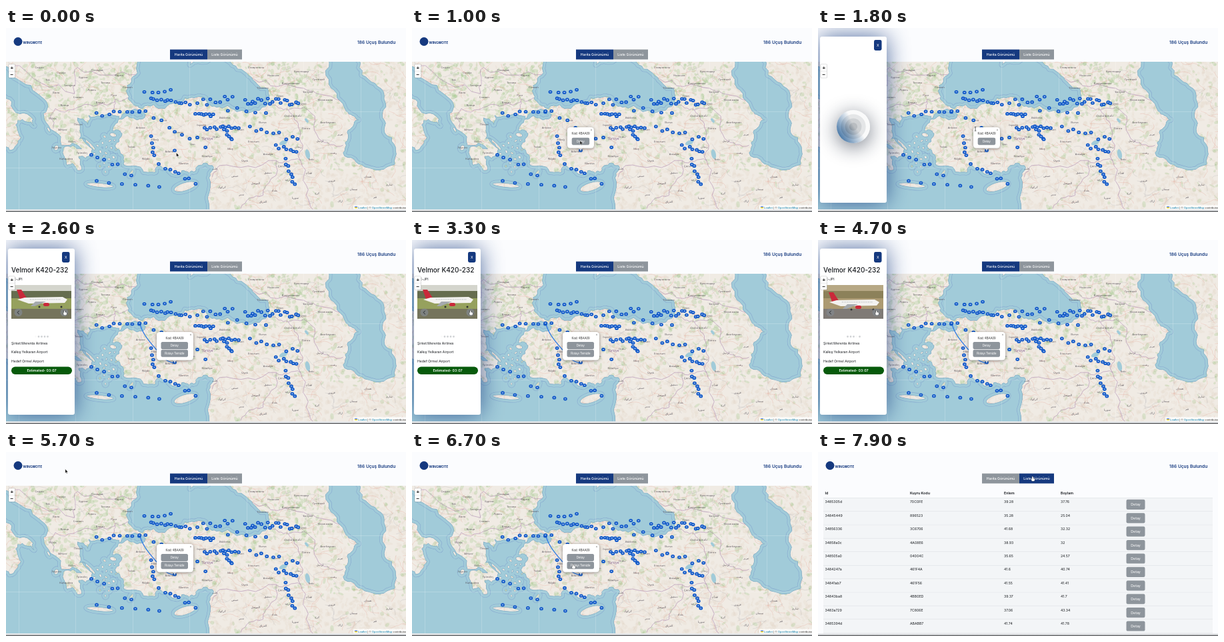
Write an HTML page with a canvas that moves like this. It is 600 px wide and 278 px high and loops after 8000 ms.

```html
<!DOCTYPE html>
<html lang="tr">
<head>
<meta charset="utf-8">
<title>Uçuş haritası</title>
<style>
html, body { margin: 0; width: 100%; height: 100%; overflow: hidden; background: #fbfcfe; }
canvas { display: block; width: 600px; height: 278px; }
</style>
</head>
<body>
<canvas id="stage"></canvas>
<script>
const W = 600, H = 278, LOOP = 8000;
const NAVY = '#15397f', GREY = '#8e959c', SEA = '#a1cbd9', LAND = '#f0ebe4', INK = '#16191d';
const UI = 'Inter, "Open Sans", sans-serif', ARIAL = '"Liberation Sans", Arial, sans-serif', NOTO = '"Noto Sans", sans-serif';
const dpr = window.devicePixelRatio || 1;

function sized(canvas) {
  canvas.width = W * dpr;
  canvas.height = H * dpr;
  const ctx = canvas.getContext('2d');
  ctx.scale(dpr, dpr);
  return ctx;
}
const view = sized(document.getElementById('stage'));
const mapCanvas = document.createElement('canvas');
let c = sized(mapCanvas);

// ---------- helpers ----------
function rect(x, y, w, h, fill, r = 0) {
  c.beginPath();
  c.roundRect(x, y, w, h, r);
  c.fillStyle = fill;
  c.fill();
}
function disc(x, y, rx, fill, ry = rx, rot = 0) {
  c.beginPath();
  c.ellipse(x, y, rx, ry, rot, 0, 7);
  c.fillStyle = fill;
  c.fill();
}
function poly(pts, fill) {
  c.beginPath();
  for (let i = 0; i < pts.length; i += 2) c.lineTo(pts[i], pts[i + 1]);
  c.closePath();
  c.fillStyle = fill;
  c.fill();
}
function text(s, x, y, size, color, { weight = 400, font = UI, align = 'left' } = {}) {
  c.font = `${weight} ${size}px ${font}`;
  c.textAlign = align;
  c.fillStyle = color;
  c.fillText(s, x, y + size * 0.36);
}
function shadowed(color, blur, dy, draw) {
  c.save();
  c.shadowColor = color;
  c.shadowBlur = blur * dpr;
  c.shadowOffsetY = dy * dpr;
  draw();
  c.restore();
}
function seeded(seed) {
  return () => (seed = (seed * 16807) % 2147483647) / 2147483647;
}
const mix = (a, b, k) => a + (b - a) * k;

// ---------- map: key points as longitude, latitude ----------
const merc = lat => Math.log(Math.tan(Math.PI / 4 + lat * Math.PI / 360));
const px = lon => 143 + 15.2 * (lon - 25.04);
const py = lat => 237 - 871 * (merc(lat) - 0.6581);

const mediterranean = [14,44.6, 16.4,43.5, 19.4,41.9, 19.4,40.4, 21.1,38.4, 23.1,38.1, 21.3,38.2, 21.7,36.8, 22.3,36.9,
  22.6,36.5, 23.1,36.5, 22.8,37.5, 24.05,37.7, 22.9,38.9, 22.7,40.5, 23.7,40, 23.8,40.7, 26,40.8, 26.8,40.6, 26.15,39.5,
  26.9,39.5, 26.8,38.7, 26.4,38.3, 27.2,37.6, 27.4,36.8, 29.2,36.3, 30.4,36.3, 30.7,36.85, 32.3,36.1, 33.7,36.2, 34.6,36.8,
  36,36.8, 35.8,35.5, 35,32, 14,32, 14,38.3, 16,38, 17.1,39, 16.8,40.3, 18.4,39.9, 18.3,40.4, 16.2,41.7, 14,42.2];
const blackSea = [29.6,46, 28.6,43.8, 27.5,42.5, 28.2,41.5, 29.1,41.2, 31.3,41.2, 33.3,42, 35.1,42.05, 36.4,41.3, 38.4,40.95,
  40.5,41.05, 41.6,41.6, 41.4,42.7, 39.6,43.6, 37.5,44.7, 36.6,45.4, 33.8,44.4, 33.4,45.4];
const caspian = [47,45.4, 47.5,43, 49.2,41, 50.4,40.35, 49.3,39.4, 48.9,37.8, 51,36.7, 54,36.9, 53.7,39, 52.8,40.5, 52.6,42.7, 50.5,44.2, 51,45.4];
const marmara = [26.8,40.4, 28,41.05, 29.4,40.75, 28.4,40.4];
const borders = [
  [28,42, 26.4,41.9, 26.1,40.7], [26.4,41.7, 23,41.35, 20.5,41.2, 20.3,39.7], [28.6,43.7, 22.7,44.2, 22.4,42.3, 16,44.3],
  [36,35.9, 36.7,36.8, 42.3,37.2, 44.7,37.2, 44.6,39.6, 43.5,41.1, 41.6,41.5], [40,43.4, 45,42.7, 48.6,41.8],
  [43.5,41.1, 45,41.3, 46.5,38.9, 48.9,38.4], [44.7,37.2, 45.5,34, 46,33], [42.3,37.2, 41,34.4, 38.8,33.3]];
// lon, lat, radii, tilt
const bigIsles = [[24.9, 35.22, 20, 3, 0.1], [33.3, 35.1, 17, 6, -0.3], [23.8, 38.5, 13, 2.5, 0.75],
  [28, 36.2, 2, 5, 0.5], [26.2, 39.2, 5, 3, 0.3], [19.85, 39.6, 1.5, 4, -0.5], [20.6, 38.2, 3, 4, 0.4]];

// names spread over x, y, width, height
const regions = [
  ['София Пловдив Скопје Варна Бургас Niš Тетово Sarajevo Плевен Ловеч Бяла Русе Сливен Tiranë Видин Враца', 50, 58, 140, 60],
  ['Ελλάς Πάτρα Αθήνα Λαμία Βόλος Λάρισα Τρίπολη Καλαμάτα', 70, 132, 62, 70],
  ['Tekirdağ Balıkesir İzmir Bursa Isparta Ankara Kayseri Aksaray Sivas Ordu Elâzığ Erzurum Van Tokat Muş Adana Antalya Kütahya Niğde Uşak Manisa Çorum', 180, 130, 240, 80],
  ['Ставрополь Краснодар Нальчик Грозный Владикавказ Тбилиси Батуми Гори Махачкала საქართველო', 375, 56, 110, 62],
  ['Հայաստան Azərbaycan Gəncə تبریز اردبیل زنجان رشت Bakı', 430, 128, 85, 75],
  ['حلب دمشق حمص الرقة الموصل كركوك بغداد تدمر سوريا العراق', 312, 210, 130, 55],
  ['تهران همدان قزوین ساری سمنان کرج قم اراک', 455, 215, 140, 50]];

function rough(pts, rnd, amount, depth) {
  if (!depth) return pts;
  const out = [];
  pts.forEach(([x, y], i) => {
    out.push([x, y]);
    if (i === pts.length - 1) return;
    const dx = pts[i + 1][0] - x, dy = pts[i + 1][1] - y;
    const k = (rnd() - 0.5) * amount * Math.min(1, 30 / Math.hypot(dx, dy));
    out.push([x + dx / 2 - dy * k, y + dy / 2 + dx * k]);
  });
  return rough(out, rnd, amount, depth - 1);
}
function trace(path, flat, rnd, closed) {
  const pts = [];
  for (let i = 0; i < flat.length; i += 2) pts.push([px(flat[i]), py(flat[i + 1])]);
  if (closed) pts.push(pts[0]);
  rough(pts, rnd, 0.45, 3).forEach(([x, y], i) => path[i ? 'lineTo' : 'moveTo'](x, y));
}
function island(path, x, y, rx, ry, rot) {
  const e = new Path2D();
  e.ellipse(x, y, rx, ry, rot, 0, 7);
  path.addPath(e);
}
function seaPath(rnd) {
  const sea = new Path2D();
  for (const s of [mediterranean, blackSea, caspian, marmara]) trace(sea, s, rnd, true);
  for (const [lon, lat, ...shape] of bigIsles) island(sea, px(lon), py(lat), ...shape);
  for (let i = 0; i < 20; i++) {
    const a = i * 2.4, r = Math.sqrt(i / 20);
    island(sea, 150 + Math.cos(a) * 19 * r, 189 + Math.sin(a) * 29 * r, 1 + rnd() * 1.8, 0.8 + rnd() * 1.2, rnd() * 3);
  }
  return sea;
}
function greenness(x, y) {
  if (y < 136 && x < 470) return 0.7;
  if (x < 225) return 0.5;
  if (x > 480 && y > 195 && y < 218) return 0.6;
  return y < 205 ? 0.2 : 0.07;
}
function drawMap() {
  const rnd = seeded(77), sea = seaPath(rnd);
  c.save();
  c.beginPath();
  c.rect(0, 51, W, 223);
  c.clip();
  rect(0, 51, W, 223, LAND);
  for (let i = 0; i < 3800; i++) {
    const x = rnd() * W, y = 51 + rnd() * 223, green = rnd() < greenness(x, y);
    disc(x, y, 1 + rnd() * 4, green ? 'rgba(150,196,128,.25)' : 'rgba(226,209,194,.2)', 0.8 + rnd() * 2.4, rnd() * 3);
  }
  // winding roads
  c.lineWidth = 0.45;
  for (let i = 0; i < 620; i++) {
    let x = W * rnd() ** 1.25, y = 51 + rnd() * 223, a = rnd() * 6.3;
    c.strokeStyle = i % 3 ? 'rgba(222,140,120,.5)' : 'rgba(140,140,155,.4)';
    c.beginPath();
    c.moveTo(x, y);
    for (let k = 0; k < 6; k++) {
      a += (rnd() - 0.5) * 1.2;
      c.lineTo(x += Math.cos(a) * 4.5, y += Math.sin(a) * 3.5);
    }
    c.stroke();
  }
  c.lineWidth = 0.8;
  c.strokeStyle = 'rgba(165,125,170,.65)';
  for (const b of borders) {
    const p = new Path2D();
    trace(p, b, rnd, false);
    c.stroke(p);
  }
  c.fillStyle = SEA;
  c.fill(sea, 'evenodd');
  // thin line at a fixed distance from every shore
  c.save();
  c.clip(sea, 'evenodd');
  c.lineJoin = 'round';
  for (const [w, color] of [[9, '#86a9cf'], [7.8, SEA]]) {
    c.lineWidth = w;
    c.strokeStyle = color;
    c.stroke(sea);
  }
  c.restore();
  c.lineWidth = 0.5;
  c.strokeStyle = 'rgba(110,155,180,.8)';
  c.stroke(sea);
  disc(px(43), py(38.6), 6.5, SEA, 3.2, -0.4);
  disc(px(45.4), py(37.7), 3.4, SEA, 7.5, -0.2);
  disc(px(45.3), py(40.3), 2, SEA, 4, -0.6);

  // tile seams
  for (let x = 19; x < W; x += 85.5) rect(x, 51, 0.5, 223, 'rgba(255,255,255,.4)');
  for (let y = 126; y < 274; y += 85.5) rect(0, y, W, 0.5, 'rgba(255,255,255,.4)');

  c.setTransform(1, 0, 0, 1, 0, 0);
  const onLand = (x, y) => !c.isPointInPath(sea, x, y, 'evenodd');
  c.scale(dpr, dpr);
  for (const [names, x, y, w, h] of regions)
    names.split(' ').forEach((s, i, all) => {
      const lx = x + w * ((i * 0.618) % 1), ly = y + h * (i + 0.5) / all.length;
      if (onLand(lx, ly)) text(s, lx, ly, 4.2, 'rgba(80,74,82,.85)', { font: NOTO, align: 'center' });
    });
  text('Türkiye', 302, 167, 5, '#8b6a94', { font: NOTO, align: 'center' });

  rect(521, 267.5, 79, 6.5, 'rgba(255,255,255,.8)');
  rect(523, 269.5, 4, 1.4, '#4c7be1');
  rect(523, 270.9, 4, 1.4, '#ffd500');
  let x = 528;
  for (const [s, color] of [['Leaflet', '#0078a8'], [' | © ', '#333'], ['OpenStreetMap', '#0078a8'], [' contributors', '#333']]) {
    text(s, x, 271, 4.3, color, { font: ARIAL });
    x += c.measureText(s).width;
  }
  c.restore();
}

// ---------- flights: strands from x, y to x, y with count and spread ----------
const strands = [[209, 97, 246, 94, 5, 4], [217, 107, 275, 114, 12, 4], [288, 114, 340, 103, 9, 10], [358, 111, 438, 113, 20, 11],
  [136, 132, 208, 126, 9, 8], [285, 129, 312, 132, 8, 4], [333, 123, 389, 126, 5, 6], [298, 153, 349, 149, 12, 5],
  [328, 153, 339, 169, 6, 4], [365, 147, 438, 170, 9, 12], [222, 133, 298, 176, 8, 12], [219, 165, 222, 193, 5, 4],
  [127, 187, 189, 222, 7, 10], [136, 231, 231, 242, 6, 4], [230, 208, 283, 233, 8, 6], [405, 178, 437, 185, 7, 6], [418, 200, 433, 237, 8, 6]];
const flightRnd = seeded(41);
const flights = [[253, 185], [200, 127]];
for (const [x0, y0, x1, y1, n, spread] of strands)
  for (let i = 0; i < n; i++) {
    const k = i / (n - 1);
    flights.push([mix(x0, x1, k) + (flightRnd() - 0.5) * 3, mix(y0, y1, k) + (flightRnd() - 0.5) * spread]);
  }

function drawFlights() {
  for (const [x, y] of flights) {
    disc(x, y, 2.9, '#1259c8', 2.6);
    disc(x, y, 1.3, '#a5c2ee', 0.8);
  }
}
function drawRoute() {
  c.beginPath();
  c.moveTo(200, 124);
  c.bezierCurveTo(204, 140, 212, 150, 225, 165);
  c.bezierCurveTo(232, 173, 238, 184, 253, 186);
  c.strokeStyle = '#2f7be6';
  c.lineWidth = 1.2;
  c.stroke();
}
function button(s, x, y, w, h, size, font) {
  rect(x, y, w, h, GREY, 2.2);
  text(s, x + w / 2, y + h / 2, size, '#fff', { font, align: 'center' });
}
function drawPopup(full, alpha) {
  const [x, y, w] = full ? [226, 139, 55] : [233, 150, 40];
  c.save();
  c.globalAlpha = alpha;
  shadowed('rgba(0,0,0,.4)', 5, 1, () => {
    poly([249, 180, 257, 180, 253, 185], '#fff');
    rect(x, y, w, 181.5 - y, '#fff', 4.5);
  });
  text('×', x + w - 4, y + 4, 5, '#757575', { font: ARIAL, align: 'center' });
  text('Kod: 4BAA09', 253, y + 9.3, 4.5, '#333', { font: ARIAL, align: 'center' });
  if (full) {
    button('Detay', 232.5, 154, 40.5, 11, 4.5, ARIAL);
    button('Rotayı Temizle', 232.5, 165.7, 40.5, 11, 4.5, ARIAL);
  } else button('Detay', 239.7, 165.7, 26.5, 11, 4.5, ARIAL);
  c.restore();
}

// ---------- page ----------
function drawHeader() {
  rect(0, 0, W, H, '#fbfcfe');
  disc(18, 20.5, 6.5, NAVY);
  text('WINGMOTE', 25.5, 22, 5, NAVY, { weight: 700 });
  text('186 Uçuş Bulundu', 527, 21.5, 6.6, NAVY, { weight: 600 });
}
function drawTabs(list) {
  [['Harita Görünümü', 246, 56, !list], ['Liste Görünümü', 302, 52, list]].forEach(([s, x, w, on]) => {
    rect(x, 32.6, w, 15, on ? NAVY : GREY);
    text(s, x + w / 2, 40.3, 5.2, '#fff', { weight: 500, align: 'center' });
  });
}
function drawZoom() {
  rect(3.6, 54.4, 10.4, 21.2, 'rgba(0,0,0,.22)', 1.6);
  rect(4.2, 55, 9.2, 20, '#fff', 1.2);
  rect(4.2, 64.9, 9.2, 0.4, '#ccc');
  ['+', '−'].forEach((s, i) => text(s, 8.8, 60 + i * 10, 8, '#111', { weight: 700, font: ARIAL, align: 'center' }));
}
function drawFoot() {
  const g = c.createLinearGradient(0, 274, 0, H);
  g.addColorStop(0, '#f0f1f3');
  g.addColorStop(0.5, '#d8dadd');
  g.addColorStop(1, '#3a3b3d');
  rect(0, 274, W, 4, g);
}

const rows = ['3485305d 70C0FE 39.28 37.76', '34845449 896523 35.28 25.04', '34856336 3C6706 41.68 32.32', '34858a0c 4A08E6 38.93 32',
  '348505a0 04004C 35.65 24.57', '3484247a 461F4A 41.6 40.74', '34841ab7 461F56 41.55 41.41', '34843ba8 4BB0ED 39.37 41.7',
  '3483a729 7C806E 37.06 43.34', '3485394d ABABB7 41.74 41.78'];
const cols = [10.5, 138, 279, 364];
function drawList() {
  ['Id', 'Kuyru Kodu', 'Enlem', 'Boylam'].forEach((s, i) => text(s, cols[i], 62, 5.3, INK, { weight: 600 }));
  rows.forEach((row, r) => {
    const y = 69 + r * 20.4;
    rect(8, y, 584, 20.4, '#f3f5f7');
    rect(8, y, 584, 0.5, '#d9dde1');
    row.split(' ').forEach((s, i) => text(s, cols[i], y + 6.6, 5.2, INK));
    button('Detay', 462.5, y + 2.8, 28, 15.2, 5.3, UI);
  });
  rect(8, 273, 584, 0.5, '#d9dde1');
}

// ---------- detail panel ----------
function drawSpinner(t) {
  const x = 53, y = 149;
  shadowed('rgba(20,30,50,.6)', 30, 6, () => disc(x, y, 25, '#e8eaec'));
  for (let i = 0; i < 4; i++) {
    const r = 25 - i * 6.3, a = 2.55 + (t - 1800) / 1000 * Math.PI * (1 - i * 0.1);
    const dx = Math.cos(a) * r, dy = Math.sin(a) * r;
    const g = c.createLinearGradient(x + dx, y + dy, x - dx, y - dy);
    g.addColorStop(0, `hsl(210 ${38 - i * 9}% ${48 + i * 3}%)`);
    g.addColorStop(0.6, `hsl(210 6% ${98 - i * 8}%)`);
    disc(x, y, r, g);
  }
}
function drawPhoto(slide) {
  const k = slide / 3, y = mix(91, 95, k), tail = '#c9293a';
  const tone = (hue, sat, light) => `hsl(${hue - 28 * k} ${sat}% ${light}%)`;
  c.save();
  c.beginPath();
  c.rect(8, 68, 90, 51);
  c.clip();
  rect(8, 68, 90, 51, tone(70, 8 + 18 * k, 82 - 20 * k));
  rect(8, 77, 90, 12, tone(75, 16 + 6 * k, 37 + 8 * k));
  rect(8, 88, 90, 31, tone(70, 26, 50 + 6 * k));
  rect(8, 104, 90, 15, tone(58, 12 - 8 * k, 41 + 7 * k));
  poly([16, y - 16, 23, y - 16, 32, y - 2, 22, y + 1], tail);
  poly([17, y - 1, 28, y - 4, 85, y - 5, 92, y - 1, 88, y + 4, 34, y + 5], '#f3f2f0');
  poly([44, y + 2, 60, y + 2, 43, y + 9, 37, y + 9], '#a5a9ae');
  rect(56, y + 4, 9, 5, tail, 2.5);
  for (let i = 0; i < 18; i++) rect(36 + i * 2.6, y - 1.6, 1, 0.9, '#77818c');
  for (const x of [50, 83]) disc(x, y + 10, 1.5, '#2f3134');
  c.restore();
  for (const d of [-1, 1]) {
    const x = 53 + d * 34.5;
    disc(x, 109.5, 6, 'rgba(130,135,140,.75)');
    c.beginPath();
    c.moveTo(x - d * 1.3, 106.8);
    c.lineTo(x + d * 1.4, 109.5);
    c.lineTo(x - d * 1.3, 112.2);
    c.strokeStyle = '#22262b';
    c.lineWidth = 1;
    c.stroke();
  }
}
function drawPanel(t) {
  shadowed('rgba(21,57,127,.75)', 34, 0, () => rect(3, 13, 100, 251, '#fff', 3));
  rect(84, 18, 11.5, 16, NAVY, 2.4);
  text('X', 89.7, 26, 5, '#fff', { weight: 500, align: 'center' });
  if (t < T.loaded) return drawSpinner(t);
  const slide = T.slides.filter(s => t >= s).length;
  text('Velmor K420-232', 8, 45.8, 10, INK, { weight: 500 });
  text('TC-JPI', 8, 58.7, 5.1, INK);
  drawPhoto(slide);
  for (let i = 0; i < 5; i++) disc(44.5 + i * 4.5, 146, 1.4, i === slide ? '#fafafa' : '#d0d2d5');
  ['Şirket:Merenta Airlines', 'Kalkış:Yelkaran Airport', 'Hedef:Ormel Airport'].forEach((s, i) => text(s, 8, 156 + i * 13.4, 5.1, INK));
  rect(8, 191.5, 91, 11.5, '#075a0b', 5.7);
  text('Estimated- 03:07', 53.5, 197.3, 5.3, '#fff', { weight: 600, align: 'center' });
}

// ---------- pointer: arrive, leave, x, y, shape while there ----------
const stops = [[0, 0, 255.5, 188.5, 'arrow'], [400, 700, 253, 185, 'hand'], [1050, 1300, 252, 170, 'hand'], [1720, 1830, 236, 152, 'text'],
  [2500, 4800, 88, 108, 'hand'], [5300, 5600, 88, 25, 'hand'], [6500, 6900, 242, 171, 'hand'], [7600, LOOP, 322, 38.5, 'hand']];

function pointerAt(t) {
  const i = stops.findLastIndex(s => t >= s[0]);
  const [, leave, x, y, shape] = stops[i];
  if (t <= leave) return [x, y, shape];
  const [arrive, , nx, ny] = stops[i + 1];
  let k = (t - leave) / (arrive - leave);
  k = k < 0.5 ? 4 * k ** 3 : 1 - 4 * (1 - k) ** 3;
  return [mix(x, nx, k), mix(y, ny, k), 'arrow'];
}
function drawPointer(t) {
  const [x, y, shape] = pointerAt(t);
  c.save();
  c.translate(x, y);
  c.lineJoin = 'round';
  if (shape === 'text') {
    rect(-0.3, -2.5, 0.7, 6, '#222');
    for (const e of [-2.7, 3.2]) rect(-1.3, e, 2.7, 0.5, '#222');
  } else if (shape === 'hand') {
    c.strokeStyle = '#222';
    c.lineWidth = 0.6;
    c.beginPath();
    c.roundRect(-1.8, 1.2, 4.8, 4.2, 1.4);
    c.roundRect(-1, -1.6, 1.4, 4.5, 0.7);
    c.stroke();
    c.fillStyle = '#fff';
    c.fill();
  } else {
    poly([0, 0, 0, 6, 1.4, 4.8, 2.3, 6.9, 3.2, 6.5, 2.3, 4.5, 4.2, 4.4], '#111');
    c.strokeStyle = '#fff';
    c.lineWidth = 0.4;
    c.stroke();
  }
  c.restore();
}

// ---------- timeline ----------
const T = { popup: 600, panel: 1300, loaded: 2500, slides: [3500, 3950, 4400], close: 5600, clear: 6850, list: 7700 };

function render(t) {
  const list = t >= T.list;
  drawHeader();
  if (list) drawList();
  else {
    c.drawImage(mapCanvas, 0, 0, W, H);
    const routed = t >= T.loaded && t < T.clear;
    if (routed) drawRoute();
    drawFlights();
    if (t >= T.popup) drawPopup(routed, Math.min(1, (t - T.popup) / 200));
  }
  drawTabs(list);
  if (t >= T.panel && t < T.close) drawPanel(t);
  if (!list) drawZoom();
  drawFoot();
  drawPointer(t);
}

drawMap();
c = view;
const start = performance.now();
function tick() {
  render((performance.now() - start) % LOOP);
  requestAnimationFrame(tick);
}
tick();
</script>
</body>
</html>
```
